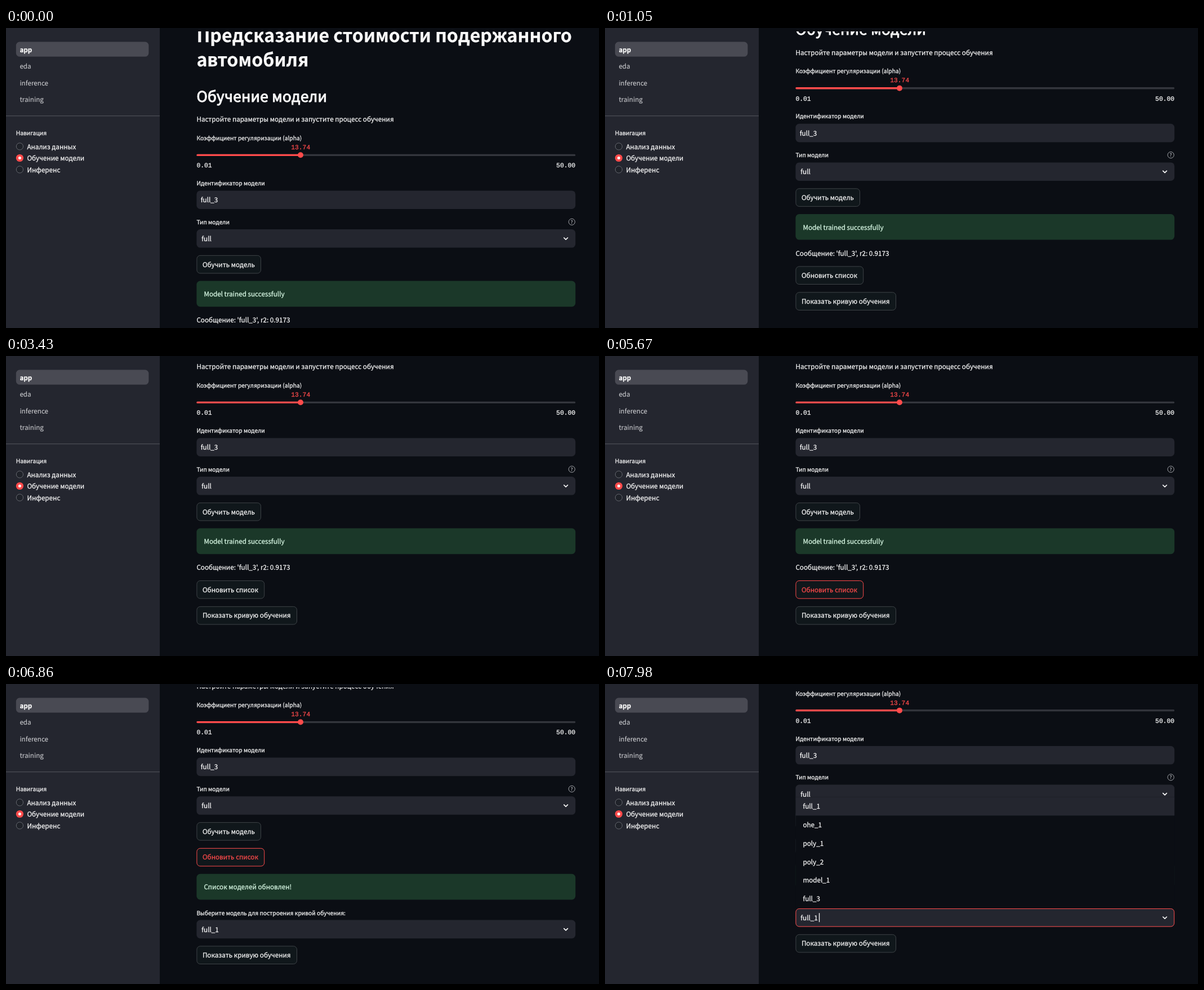
Recreate the animation shown at these times as an HTML page. Size 1053 by 532 pixels, loop 8000 ms.

```html
<!DOCTYPE html>
<html lang="ru">
<head>
<meta charset="utf-8">
<title>Обучение модели</title>
<style>
  html, body { margin: 0; width: 100%; height: 100%; overflow: hidden; background: #0b0e14; }
  svg { display: block; width: 1053px; height: 532px; }
  text {
    font-family: "Noto Sans CJK SC", "Noto Sans CJK JP", "Noto Sans CJK", "Noto Sans", sans-serif;
    font-size: 11.7px; color: #fafafa; text-rendering: geometricPrecision; white-space: pre;
    fill: currentColor; stroke: currentColor; stroke-width: .25px;
  }
  .label { font-size: 10.25px; }
  .h1 { font-size: 32.08px; font-weight: 700; }
  .h2 { font-size: 26.1px; letter-spacing: .3px; stroke-width: 1.05px; }
  .mono { font-family: "Liberation Mono", monospace; font-size: 11.375px; }
  .red { color: #ff4b4b; }
  .link { color: #c9cacd; stroke-width: .1px; }
  .bold { font-weight: 600; }
  .ok { color: #ddfde9; }
  .end { text-anchor: end; }
  .mid { text-anchor: middle; }
  .help { font-size: 8.2px; color: #a3a5aa; stroke: none; }
</style>
</head>
<body>
<svg id="stage" viewBox="0 0 1053 532"></svg>
<script>
const LOOP = 8000, STEP = 70;
const BG = '#0b0e14', PANEL = '#24262f', RED = '#ff4b4b', GREEN = '#1b3829';
const LEFT = 338.4, RIGHT = 1011.2, WIDE = RIGHT - LEFT, FIELD = 32.6;
const stage = document.getElementById('stage');

function add(parent, tag, attrs, content) {
  const el = document.createElementNS('http://www.w3.org/2000/svg', tag);
  for (const key in attrs) el.setAttribute(key, attrs[key]);
  if (content) el.textContent = content;
  parent.appendChild(el);
  return el;
}
const group = parent => add(parent, 'g', {});
const text = (parent, x, y, content, cls = '') =>
  add(parent, 'text', { x, y, class: cls }, content);
const rect = (parent, x, y, width, height, rx, fill, stroke = 'none') =>
  add(parent, 'rect', { x, y, width, height, rx, fill, stroke, 'stroke-width': 1 });
const circle = (parent, cx, cy, r, fill, stroke = 'none') =>
  add(parent, 'circle', { cx, cy, r, fill, stroke, 'stroke-width': 1 });

function button(parent, y, width, caption, { fill = '#10171b', stroke = '#3e4347', cls = '' } = {}) {
  const g = group(parent);
  rect(g, LEFT + .5, y + .5, width - 1, FIELD - 1, 6, fill, stroke);
  text(g, 348.9, y + 20.6, caption, cls);
  return g;
}

function select(parent, y, value) {
  rect(parent, LEFT, y, WIDE, FIELD, 6.5, PANEL);
  text(parent, 347.3, y + 21, value);
  add(parent, 'path', {
    d: `M990.8 ${y + 15}l3.3 3.2 3.3-3.2`, fill: 'none', stroke: '#fafafa',
    'stroke-width': 1.7, 'stroke-linecap': 'round', 'stroke-linejoin': 'round'
  });
}

function alertBox(parent, y, caption) {
  rect(parent, LEFT, y, WIDE, 45.6, 6.5, GREEN);
  text(parent, 351.4, y + 27.7, caption, 'ok');
}

function buildSidebar() {
  rect(stage, 0, 0, 273, 532, 0, PANEL);
  rect(stage, 17.8, 24.6, 235.6, 26.2, 6.5, '#494a53');
  ['app', 'eda', 'inference', 'training'].forEach((name, i) =>
    text(stage, 24.4, 42.7 + i * 29.4, name, i ? 'link' : 'bold'));
  rect(stage, 0, 155.2, 273, 1.2, 0, '#4e5057');
  text(stage, 17.8, 190, 'Навигация', 'label');
  ['Анализ данных', 'Обучение модели', 'Инференс'].forEach((name, i) => {
    const y = 210 + i * 20.5;
    if (i === 1) {
      circle(stage, 24.4, y, 6.6, RED);
      circle(stage, 24.4, y, 2.5, '#fff');
    } else circle(stage, 24.4, y, 6.1, '#1f2229', '#65676e');
    text(stage, 37.4, y + 4.6, name);
  });
}

function buildForm(page) {
  text(page, LEFT, 25.3, 'Предсказание стоимости подержанного', 'h1');
  text(page, LEFT, 68.2, 'автомобиля', 'h1');
  text(page, LEFT, 131, 'Обучение модели', 'h2');
  text(page, LEFT, 166.2, 'Настройте параметры модели и запустите процесс обучения');
  text(page, LEFT, 199, 'Коэффициент регуляризации (alpha)', 'label');
  rect(page, LEFT, 223.7, WIDE, 3.3, 1.6, '#34363d');
  rect(page, LEFT, 223.7, 184.6, 3.3, 1.6, RED);
  circle(page, 523, 225.3, 5, RED);
  text(page, 523.2, 215, '13.74', 'mono red mid');
  text(page, LEFT, 247.2, '0.01', 'mono');
  text(page, RIGHT, 247.2, '50.00', 'mono end');
  text(page, LEFT, 279, 'Идентификатор модели', 'label');
  rect(page, LEFT, 288.4, WIDE, FIELD, 6.5, PANEL);
  text(page, 345.8, 309.3, 'full_3');
  text(page, LEFT, 347.8, 'Тип модели', 'label');
  circle(page, 1004.7, 343.8, 5.6, 'none', '#a3a5aa');
  text(page, 1004.7, 346.8, '?', 'help mid bold');
  select(page, 357, 'full');
  button(page, 402.9, 114.6, 'Обучить модель');
}

function buildMenu(parent) {
  const menu = group(parent), row = 32.72, top = 379;
  rect(menu, LEFT, top, WIDE, row * 6, 0, BG);
  rect(menu, LEFT, top, WIDE, row, 0, PANEL);
  ['full_1', 'ohe_1', 'poly_1', 'poly_2', 'model_1', 'full_3'].forEach((name, i) =>
    text(menu, 351.4, top + 20.8 + i * row, name));
  return menu;
}

buildSidebar();
const page = group(stage);
buildForm(page);

const trained = group(page);
alertBox(trained, 448.6, 'Model trained successfully');
text(trained, LEFT, 522.3, "Сообщение: 'full_3', r2: 0.9173");

const updated = group(page);
alertBox(updated, 494.6, 'Список моделей обновлен!');
text(updated, LEFT, 567.4, 'Выберите модель для построения кривой обучения:', 'label');
select(updated, 576.4, 'full_1');

const refresh = group(page);
const refreshLooks = [
  {},
  { stroke: RED, cls: 'red' },
  { fill: RED, stroke: RED }
].map(look => button(refresh, 0, 120.8, 'Обновить список', look));
const show = group(page);
button(show, 0, 178.6, 'Показать кривую обучения');

const focus = group(page);
rect(focus, LEFT + .5, 576.9, WIDE - 1, FIELD - 1, 6, 'none', RED);
rect(focus, 379.9, 584.6, 1.3, 16, 0, '#fafafa');
const menu = buildMenu(page);

// Strip that hides the page under the top edge
rect(stage, 273, 0, 780, 6, 0, BG);

// [time, value] pairs; both scrolls overshoot the end and spring back
const scroll = [
  [770, 0], [840, 8], [910, 35], [980, 80], [1050, 118.6], [1120, 139], [1190, 144.6],
  [1400, 144.6], [1540, 143], [6790, 143], [6860, 157.8], [6930, 171], [7000, 180.5],
  [7070, 185], [7140, 185.6], [7210, 183.6], [7280, 181.2], [7350, 179.4], [7420, 178.4]
];
const hover = [[2590, 0], [2730, 1], [3360, 1], [3430, 0], [5600, 0], [5670, 1], [7560, 1], [7630, 0]];
const menuFade = [[7700, 0], [7770, .3], [7840, .75], [7910, 1]];

function sample(keys, t) {
  if (t <= keys[0][0]) return keys[0][1];
  const i = keys.findIndex(key => key[0] > t);
  if (i < 0) return keys[keys.length - 1][1];
  const [t0, a] = keys[i - 1], [t1, b] = keys[i];
  return a + (b - a) * (t - t0) / (t1 - t0);
}

const shift = (el, y) => el.setAttribute('transform', `translate(0 ${y})`);
const fade = (el, value) => el.setAttribute('opacity', value);

function render(time) {
  const t = Math.floor(time / STEP) * STEP;
  const done = t >= 6160;
  const pressed = t >= 5880 && t < 6020;
  const hot = sample(hover, t);
  shift(page, -sample(scroll, t));
  fade(trained, done ? 0 : 1);
  fade(updated, done ? 1 : 0);
  shift(refresh, done ? 448.7 : 541);
  shift(show, done ? 622.2 : 586.9);
  fade(refreshLooks[0], hot < 1 ? 1 : 0);
  fade(refreshLooks[1], pressed ? 0 : hot);
  fade(refreshLooks[2], pressed ? 1 : 0);
  fade(focus, t >= 7770 ? 1 : 0);
  fade(menu, sample(menuFade, t));
}

const start = performance.now();
function tick() {
  render((performance.now() - start) % LOOP);
  requestAnimationFrame(tick);
}
tick();
</script>
</body>
</html>
```
